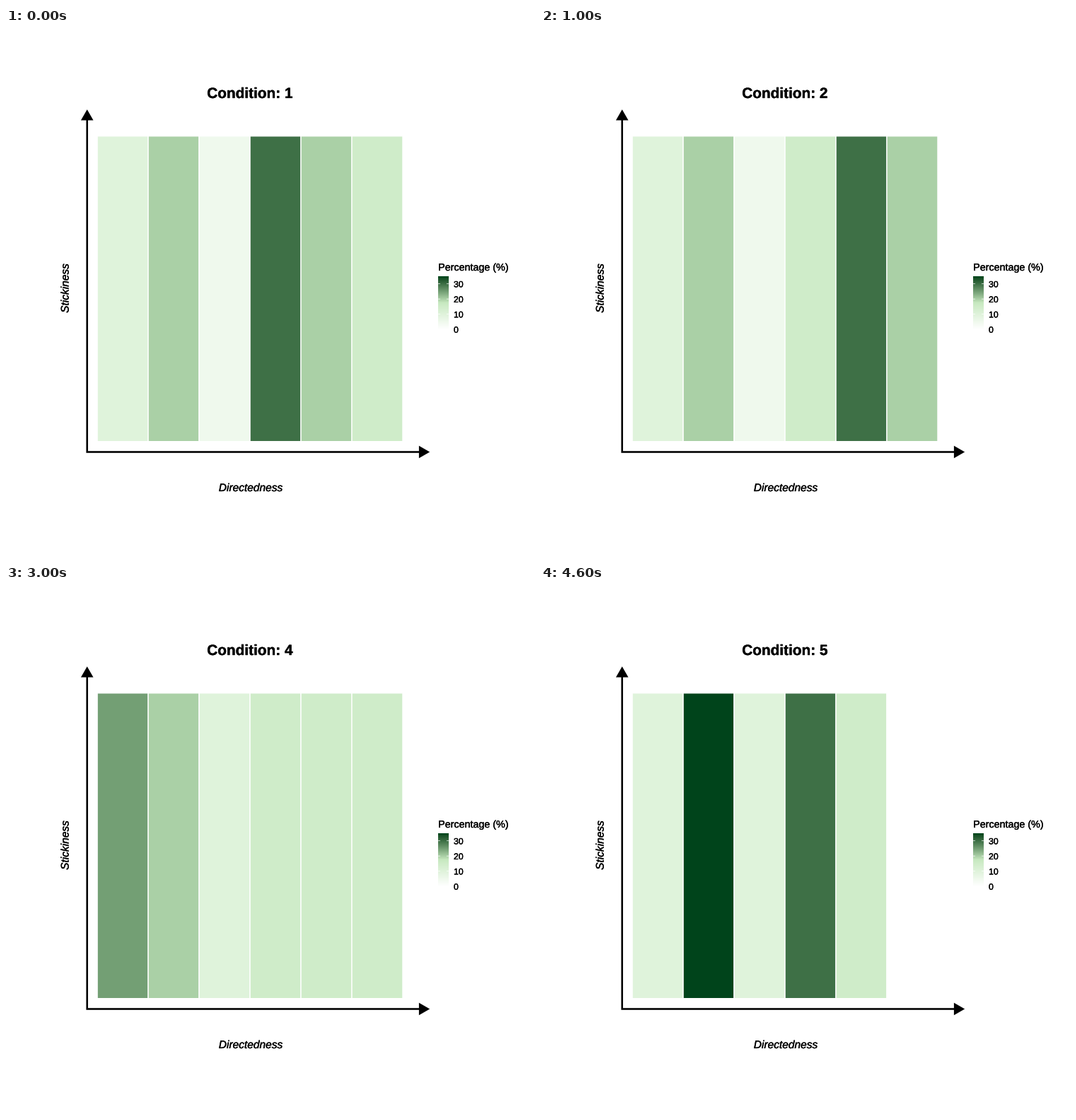
Recreate the animation shown at these times as a matplotlib script. Size 748 by 748 pixels, loop 5 s.

```python
import matplotlib.patheffects as pe
import matplotlib.pyplot as plt
import numpy as np
from matplotlib.animation import FuncAnimation
from matplotlib.colors import ListedColormap, to_rgb
from matplotlib.patches import Polygon, Rectangle

SIZE, DPI = 748, 88
PT = 72 / DPI  # points per pixel

plt.rcParams["font.family"] = "Liberation Sans"
plt.rcParams["text.hinting"] = "no_hinting"

# Leading percentages per condition; the last column takes the rest
LEADING = [(10, 20, 5, 30, 20), (10, 20, 5, 15, 30), (20, 25, 20, 5, 15),
           (25, 20, 10, 15, 15), (10, 35, 10, 30, 15)]
TOP = 35

RGB_TO_XYZ = np.array([[0.4124, 0.3576, 0.1805],
                       [0.2126, 0.7152, 0.0722],
                       [0.0193, 0.1192, 0.9505]])
WHITE = RGB_TO_XYZ.sum(axis=1)


def to_lab(color):
    """Cube-root responses, a linear form of CIE Lab."""
    c = np.array(to_rgb(color))
    c = np.where(c > 0.04045, ((c + 0.055) / 1.055) ** 2.4, c / 12.92)
    t = RGB_TO_XYZ @ c / WHITE
    return np.where(t > 0.008856, np.cbrt(t), 7.787 * t + 16 / 116)


def from_lab(f):
    t = np.where(f > 0.2069, f ** 3, (f - 16 / 116) / 7.787)
    c = np.clip(np.linalg.solve(RGB_TO_XYZ, t * WHITE), 0, 1)
    return np.where(c > 0.0031308, 1.055 * c ** (1 / 2.4) - 0.055, 12.92 * c)


ENDS = [to_lab(c) for c in ("#ffffff", "#c7e9c0", "#00441b")]


def shade(value):
    """White to pale to dark green, with the pale tone halfway."""
    part = 2 * value / TOP
    i = min(int(part), 1)
    return from_lab(ENDS[i] + (ENDS[i + 1] - ENDS[i]) * (part - i))


fig = plt.figure(figsize=(SIZE / DPI, SIZE / DPI), dpi=DPI, facecolor="white")
ax = fig.add_axes([0, 0, 1, 1])


def label(x, y, text, px, **kw):
    weight = pe.withStroke(linewidth=0.35 * PT, foreground="black")
    return ax.text(x, y, text, fontsize=px * PT, color="black",
                   va="baseline", rotation_mode="anchor",
                   path_effects=[weight], **kw)


def line(xs, ys, px, color):
    ax.plot(xs, ys, color=color, lw=px * PT, solid_capstyle="butt",
            solid_joinstyle="miter", snap=False, zorder=3)


def arrow_head(x, y, dx, dy, length=15.3, half=8.8):
    """Triangle with its tip at (x, y), pointing along (dx, dy)."""
    bx, by = x - length * dx, y - length * dy
    ax.add_patch(Polygon([(x, y), (bx + half * dy, by + half * dx),
                          (bx - half * dy, by - half * dx)],
                         fc="black", ec="none", zorder=3))


# Legend
BAR_X, BAR_Y, BAR_W, BAR_H = 611, 351, 15, 75
greens = ListedColormap([shade(v) for v in np.linspace(0, TOP, 300)])
ax.imshow(np.linspace(TOP, 0, 300)[:, None], cmap=greens, vmin=0, vmax=TOP,
          extent=(BAR_X, BAR_X + BAR_W, BAR_Y + BAR_H, BAR_Y), aspect="auto")
ax.set(xlim=(0, SIZE), ylim=(SIZE, 0))
ax.axis("off")
label(611.2, 343, "Percentage (%)", 14.3)
for value in range(0, TOP, 10):
    y = BAR_Y + BAR_H * (1 - value / TOP)
    label(633, y + 4.8, str(value), 12.3)
    for x in (BAR_X, BAR_X + BAR_W - 3):
        line([x, x + 3], [y, y], 0.7, "white")

# Axes
AX_X, AX_Y = 114.7, 599.5
line([AX_X, AX_X, 590], [125, AX_Y, AX_Y], 2.6, "black")
arrow_head(AX_X, 115.2, 0, -1)
arrow_head(599.2, AX_Y, 1, 0)
label(346, 655, "Directedness", 15.5, ha="center", style="italic")
label(88.5, 368, "Stickiness", 15.5, ha="center", style="italic", rotation=90)

# Columns
COLUMNS = 6
LEFT, LOWER, STEP = 129.1, 584.7, 71.98
HEIGHT = COLUMNS * STEP
tiles = [
    ax.add_patch(Rectangle((LEFT + i * STEP, LOWER - HEIGHT), STEP, HEIGHT,
                           ec="white", lw=1.4 * PT, snap=False))
    for i in range(COLUMNS)
]
title = label(284.2, 99, "", 20.8, weight="bold")


def update(k):
    title.set_text(f"Condition: {k + 1}")
    shares = [*LEADING[k], 100 - sum(LEADING[k])]
    for tile, value in zip(tiles, shares):
        tile.set_facecolor(shade(value))
    return [title, *tiles]


anim = FuncAnimation(fig, update, frames=len(LEADING), interval=1000,
                     repeat=True, repeat_delay=0, blit=False)
plt.show()
```
